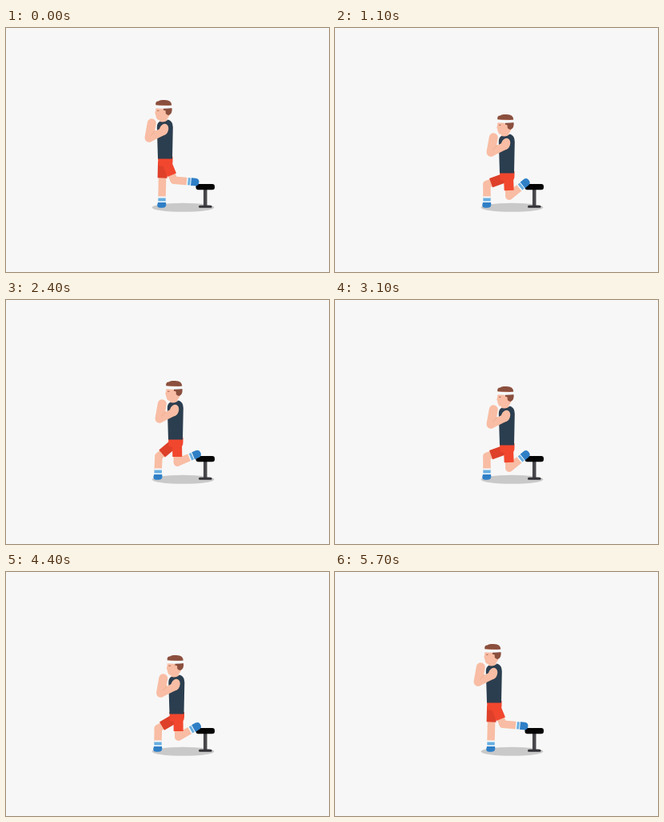
An HTML page without scripts for the animation above (5800 ms loop, 404x305 px).

```html
<!DOCTYPE html>
<html lang="en">
<head>
<meta charset="utf-8">
<title>Split squat</title>
<style>
html, body { margin: 0; width: 100%; height: 100%; overflow: hidden; background: #f7f7f7; }
svg { display: block; width: 100vw; height: 100vh; }

/* --x, --y: how far the body has moved from standing */
.man { --x: 0; --y: 0; animation: squat 5.8s step-end infinite; }
.body { transform: translate(calc(var(--x) * 1px), calc(var(--y) * 1px)); }

/* Two-bone legs: thigh --a and shank --b reach (--dx, --dy) from the hip */
.leg {
  --r: hypot(var(--dx), var(--dy));
  --aim: atan2(var(--dy), var(--dx));
  --aa: calc(var(--a) * var(--a));
  --bb: calc(var(--b) * var(--b));
  --rr: calc(var(--r) * var(--r));
  --lift: acos(min(1, (var(--rr) + var(--aa) - var(--bb)) / (2 * var(--a) * var(--r))));
  --bend: acos(min(1, (var(--rr) - var(--aa) - var(--bb)) / (2 * var(--a) * var(--b))));
  transform: translate(var(--hip)) rotate(calc(var(--aim) + var(--lift)));
}
.shank { transform: translate(calc(var(--a) * 1px), 0) rotate(calc(var(--bend) * -1)); }
.front {
  --a: 23.5; --b: 16.5; --hip: 196px, 169.5px;
  --shift: min(5, var(--x) * .37);
  --dx: calc(-1 - var(--shift) - var(--x)); --dy: calc(42.5 - var(--y));
}
.back {
  --a: 24; --b: 20; --hip: 201px, 168px;
  --dx: calc(29 - var(--x) * .78); --dy: calc(24 - var(--y) * .7);
}
.foot { --shift: min(5, var(--x) * .37); transform: translate(calc((195 - var(--shift)) * 1px), 212px); }

.limb { fill: none; stroke: #f8bda4; stroke-width: 9.5; stroke-linecap: round; stroke-linejoin: round; }
.arm { stroke-width: 11; }
.short { fill: none; stroke: #f1472e; stroke-width: 12; }
.far { stroke: #de402a; }
.skin { fill: #f8bda4; }
.hair { fill: #8b4f3e; }
.shoe { fill: #2f7fc6; }
.stripe { fill: #67aee0; }
.white { fill: #f4fafe; }

@keyframes squat {
  0%, 29.31%, 60.34%, 93.1% { --x: 0; --y: 0; }
  8.62%, 39.65%, 72.41% { --x: 5.5; --y: 2; }
  10.34%, 41.37%, 74.13% { --x: 13; --y: 11; }
  12.06%, 43.1%, 75.86% { --x: 14.5; --y: 14; }
  13.79%, 44.82%, 77.58% { --x: 15.2; --y: 16; }
  15.51%, 46.55%, 79.31% { --x: 15.7; --y: 17.3; }
  17.24%, 48.27%, 81.03% { --x: 16; --y: 18; }
  24.13%, 55.17%, 87.93% { --x: 10; --y: 7; }
  25.86%, 56.89%, 89.65% { --x: 6.5; --y: 3; }
  27.58%, 58.62%, 91.37% { --x: 3; --y: 1; }
}
</style>
</head>
<body>
<svg viewBox="0 0 404 305">
  <ellipse cx="221.500" cy="224.300" rx="39" ry="5.500" fill="#c9c9c9"/>

  <g class="bench">
    <path d="M247 201h4.500v21h-4.500z" fill="#46464b"/>
    <rect x="241" y="221.800" width="16.500" height="3" rx="1.500" fill="#333338"/>
    <rect x="237.500" y="195" width="23.500" height="7.200" rx="3" fill="#050505"/>
  </g>

  <g class="man">
    <g class="body">
      <g class="leg front">
        <path class="limb" d="M0 0H23.500"/>
        <g class="shank"><path class="limb" d="M0 0H17"/></g>
        <path class="short far" d="M-2 0H18"/>
      </g>
    </g>

    <g class="foot">
      <path class="white" d="M-4.700-1.500H4.700V7H-4.700z"/>
      <path class="stripe" d="M-4.700 .5H4.700V4.500H-4.700z"/>
      <path class="shoe" d="M-5 6H5Q6.500 12.800 1 12.800H-2.500Q-7.500 12.800-5 6z"/>
    </g>

    <g class="body">
      <g class="leg back">
        <path class="limb" d="M0 0H24"/>
        <g class="shank">
          <path class="limb" d="M0 0H15"/>
          <path class="white" d="M16-4.500h6v9h-6z"/>
          <path class="stripe" d="M17.500-4.500h3v9h-3z"/>
          <path class="shoe" d="M21.500-4.800h5q5 0 5 4.600q0 5-5 5h-5z"/>
        </g>
        <path class="short" d="M-2 0H17"/>
      </g>

      <path d="M190 161H208.500V167Q208.500 173 203 174L190.500 172z" fill="#f1472e"/>
      <path class="skin" d="M192 107h9.500v11h-9.500z"/>
      <path d="M192 117Q199 118.500 202.500 114.500Q208.800 116 208.800 124L208 163.500H190L188.800 124Q188.800 119 192 117z" fill="#2b3e4f"/>

      <path class="skin" d="M187.500 95H205V106Q204 115 196 115H192Q188 115 187.500 110L186.300 106 187.200 103z"/>
      <path class="hair" d="M187.300 96.500Q186.500 91.500 190.500 91.500Q192.500 89.500 196.500 90Q207.300 89 207.300 97zM197 100H207.500Q208.500 107 203.500 109Q199.500 108.500 199.500 105H197z"/>
      <circle class="skin" cx="198" cy="104.500" r="1.700"/>
      <path class="white" d="M187 96.600Q198 98 208.500 96.600V100Q198 101.300 187 100.300z"/>
      <path d="M189 103.300h2.500" stroke="#b0705c" stroke-width="1.100"/>

      <path class="limb" d="M197 129L180 137.500"/>
      <path class="limb arm" d="M179 137.300L182.300 118.800"/>
      <ellipse class="skin" cx="197.500" cy="127" rx="5.500" ry="7.500" transform="rotate(20 197.500 127)"/>
      <path d="M181.500 134.500L187 128" fill="none" stroke="#eba98f" stroke-width=".8"/>
    </g>
  </g>
</svg>
</body>
</html>
```
